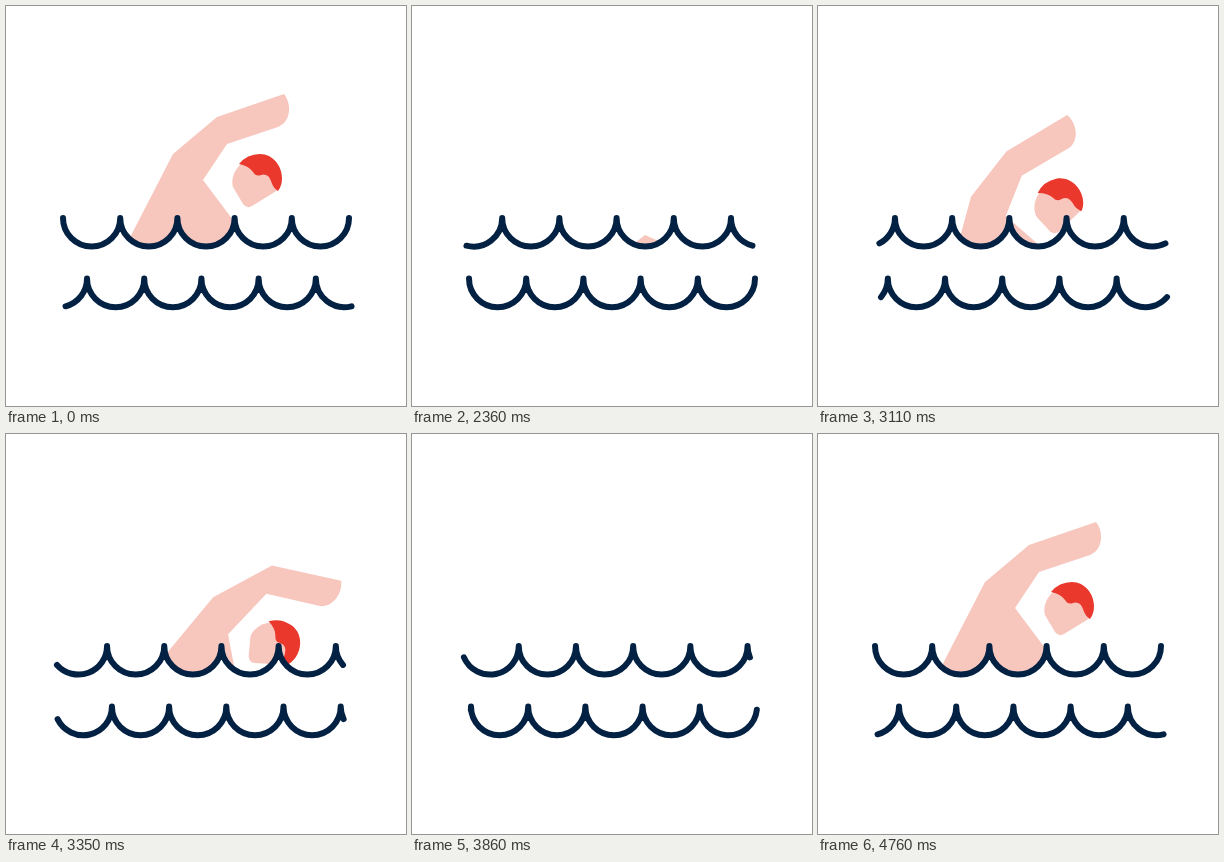
Recreate the animation shown at these times as an HTML page. Size 400x400 px, loop 4.79 s.

```html
<!DOCTYPE html>
<html lang="en">
<head>
<meta charset="utf-8">
<title>Swimmer</title>
<style>
  html, body { margin: 0; width: 100%; height: 100%; overflow: hidden; background: #fff; }
  svg { display: block; width: 100vw; height: 100vh; }
  .wave { fill: none; stroke: #032143; stroke-width: 6; stroke-linecap: round; stroke-linejoin: round; }
  .skin { fill: #f7c6bd; }
  .cap { fill: #ea382d; }
</style>
</head>
<body>
<svg viewBox="0 0 400 400">
  <clipPath id="air"><path id="airShape"/></clipPath>
  <g clip-path="url(#air)">
    <g id="swimmer">
      <path id="body" class="skin"/>
      <g id="head">
        <path class="skin" d="M235 158C227 165 225 175 227 181L237 198Q241 203 246 200L272 184L262 162Z"/>
        <path class="cap" d="M233 158Q241 148 254 148C267 148 276 160 276 172Q276 180 272 185Q267 182 265 175Q262 167 255 169Q250 171 247 166Q243 160 233 158Z"/>
      </g>
    </g>
  </g>
  <path id="top" class="wave"/>
  <path id="bottom" class="wave"/>
</svg>
<script>
const LOOP = 4790, HOLD = 2030, STEP = 30;
const LEFT = 57, ARCS = 5, PITCH = 57.2, R = PITCH / 2;
const TOP_Y = 212, BOTTOM_Y = 272.6;
const PIVOT = [202, 219];
const MID = 31, DEEP = 95;

// Wave phase in arcs: [time, phase]; the last stretch eases out.
const TOP_KEYS = [[0, 0], [30, .01], [360, .42], [840, 1], [1350, 2.23], [1860, 3.13], [2160, 3.6], [2760, 4]];
const BOTTOM_KEYS = [[0, .58], [360, 1], [840, 1.36], [1350, 2.145], [1860, 2.965], [2160, 3.47], [2760, 3.58]];

// Torso corners at dive angles 0, MID and DEEP.
const TORSO = {
  hipLeft: [[117, 245], [139, 245], [200, 255]],
  shoulder: [[167, 148], [207, 163], [233, 229]],
  armpit: [[197, 174], [222, 200], [240, 250]],
  waist: [[227, 214], [228, 232], [240, 252]],
  hipRight: [[228, 245], [229, 245], [240, 255]]
};

const $ = id => document.getElementById(id);
const mix = (a, b, k) => a + (b - a) * k;
const fix = n => n.toFixed(2);
const pt = p => p.map(fix).join(' ');

function track(keys, t) {
  const i = Math.max(1, keys.findIndex(k => t <= k[0]));
  const [t0, v0] = keys[i - 1], [t1, v1] = keys[i];
  const k = (t - t0) / (t1 - t0);
  return mix(v0, v1, i === keys.length - 1 ? 1 - (1 - k) ** 2 : k);
}

// The arcs slide left while the visible stretch runs along them.
function wave(phase, y) {
  const u = phase % 1, x = LEFT - PITCH * u;
  const arc = (px, py) => `A${R} ${R} 0 0 0 ${fix(px)} ${fix(py)}`;
  const sx = x + R * (1 - Math.cos(Math.PI * u)), sy = y + R * Math.sin(Math.PI * u);
  let d = `M${fix(sx)} ${fix(sy)}`;
  for (let i = 1; i <= ARCS; i++) d += arc(x + i * PITCH, y);
  return d + arc(sx + ARCS * PITCH, sy);
}

function airAbove(phase, y) {
  const x = LEFT - PITCH * (phase % 1 + 2);
  let d = `M${fix(x)} 0V${y}`;
  for (let i = 1; i <= 10; i++) d += `A${R} ${R} 0 0 0 ${fix(x + i * PITCH)} ${y}`;
  return d + 'V0Z';
}

function bodyPath(angle) {
  const a = angle * Math.PI / 180, c = Math.cos(a), s = Math.sin(a);
  const extra = Math.max(0, angle - MID);
  const spin = (x, y) => {
    const dx = x - PIVOT[0], dy = y - PIVOT[1];
    return pt([PIVOT[0] + dx * c - dy * s + extra / 4, PIVOT[1] + dx * s + dy * c + extra / 2]);
  };
  const joint = name => {
    const late = angle > MID ? 1 : 0;
    const k = late ? extra / (DEEP - MID) : angle / MID;
    const [from, to] = TORSO[name].slice(late);
    return pt([mix(from[0], to[0], k), mix(from[1], to[1], k)]);
  };
  return `M${joint('hipLeft')}L${joint('shoulder')}L${spin(211, 111)}L${spin(278, 88)}` +
    `C${spin(286, 98)} ${spin(285, 116)} ${spin(272, 121)}L${spin(221, 138)}` +
    `L${joint('armpit')}L${joint('waist')}L${joint('hipRight')}Z`;
}

// Depth below the upright pose (1 = under water) and dive angle.
function stroke(m) {
  const dive = t => ({ depth: 0, angle: DEEP * (t / 360) ** 1.6 });
  if (m <= 375) return dive(m);
  if (m >= 870 && m < 1170) return { depth: 1 - (m - 870) / 300, angle: 0 };
  if (m >= 1170 && m <= 1545) return dive(m - 1170);
  if (m >= 2160) return { depth: (1 - (m - 2160) / 600) ** 2, angle: 0 };
  return null;
}

function draw(time) {
  const t = time % LOOP;
  const m = t < HOLD ? 0 : STEP * (Math.floor((t - HOLD) / STEP) + 1);
  const topPhase = track(TOP_KEYS, m);
  $('top').setAttribute('d', wave(topPhase, TOP_Y));
  $('bottom').setAttribute('d', wave(track(BOTTOM_KEYS, m), BOTTOM_Y));
  $('airShape').setAttribute('d', airAbove(topPhase, TOP_Y));

  const pose = stroke(m);
  $('swimmer').setAttribute('visibility', pose ? 'visible' : 'hidden');
  if (!pose) return;
  $('swimmer').setAttribute('transform', `translate(0 ${fix(170 * pose.depth)}) rotate(${fix(-60 * pose.depth)} ${PIVOT})`);
  $('body').setAttribute('d', bodyPath(pose.angle));
  $('head').setAttribute('transform', `rotate(${fix(pose.angle * 1.13)} ${PIVOT})`);
}

let start;
function tick(now) {
  start ??= now;
  draw(now - start);
  requestAnimationFrame(tick);
}
draw(0);
requestAnimationFrame(tick);
</script>
</body>
</html>
```
